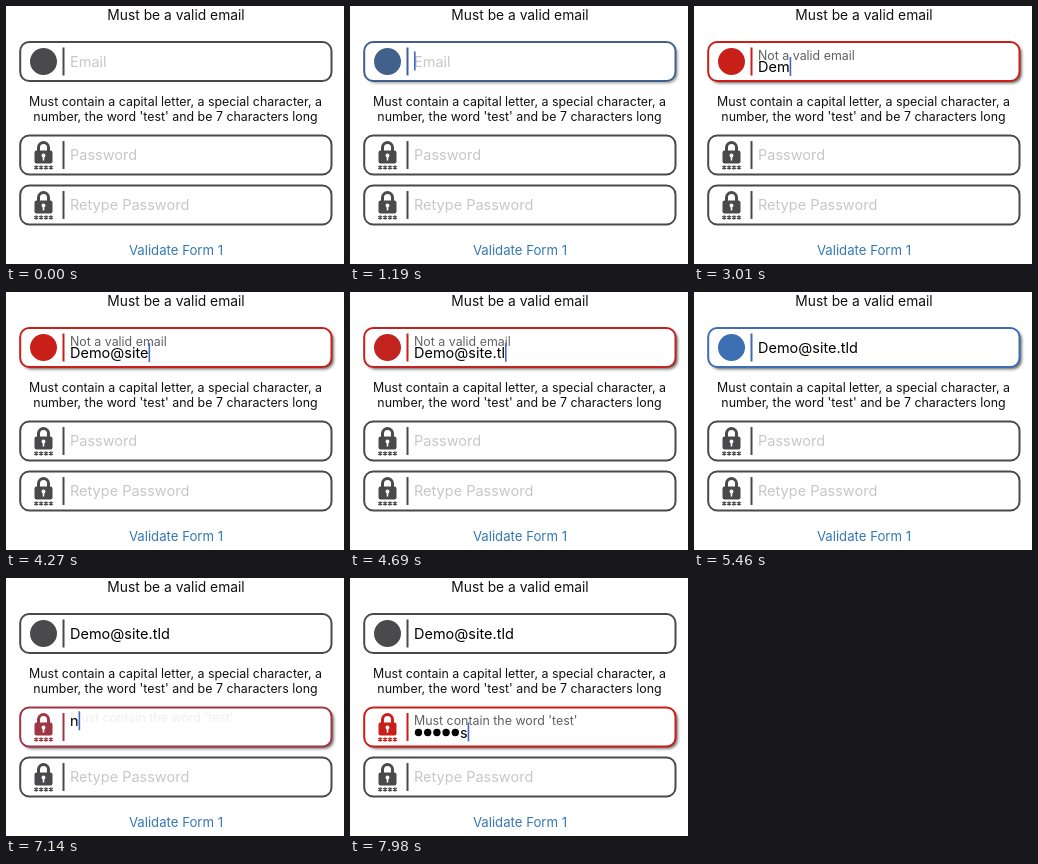
An HTML page with a canvas for the animation above (8000 ms loop, 338 by 258 pixels).

```html
<!DOCTYPE html>
<html lang="en">
<head>
<meta charset="utf-8">
<title>Form validation</title>
<style>
  html, body { margin: 0; width: 100%; height: 100%; overflow: hidden; background: #fff; }
  canvas { display: block; }
</style>
</head>
<body>
<canvas id="stage" width="338" height="258"></canvas>
<script>
const ctx = document.getElementById('stage').getContext('2d');
const LOOP = 8000, STEP = 70;
const GRAY = [74, 74, 76], BLUE = [60, 110, 178], LIGHT = [84, 134, 200], RED = [200, 32, 24];
const EMAIL = 'Demo@site.tld', PASSWORD = 'n1?Tes';
const EMAIL_KEYS = [2450, 2800, 3010, 3220, 3430, 3640, 3850, 4060, 4200, 4480, 4620, 4690, 4900];
const PASSWORD_KEYS = [7140, 7280, 7420, 7560, 7700, 7840];
let t = 0;

const ramp = (start, length) => Math.min(1, Math.max(0, (t - start) / length));
const mix = (a, b, p) => a + (b - a) * p;
const rgb = c => `rgb(${c.map(Math.round)})`;
const typed = (text, keys) => text.slice(0, keys.filter(k => t >= k).length);

// Each change is [start, colour, duration]
function tone(changes) {
  return rgb(changes.reduce((from, [start, to, length]) =>
    from.map((v, i) => mix(v, to[i], ramp(start, length))), GRAY));
}

function write(text, x, y, size, color, align = 'left') {
  ctx.font = `${size}px Inter, "Liberation Sans", sans-serif`;
  ctx.textAlign = align;
  ctx.fillStyle = color;
  ctx.fillText(text, x, y);
  return ctx.measureText(text).width;
}

function dot(x, y, r, color) {
  ctx.fillStyle = color;
  ctx.beginPath();
  ctx.arc(x, y, r, 0, 2 * Math.PI);
  ctx.fill();
}

function lock(mid, color) {
  ctx.strokeStyle = ctx.fillStyle = color;
  ctx.lineWidth = 3;
  ctx.beginPath();
  ctx.moveTo(32.5, mid - 3);
  ctx.lineTo(32.5, mid - 7.5);
  ctx.arc(37.5, mid - 7.5, 5, Math.PI, 0);
  ctx.lineTo(42.5, mid - 3);
  ctx.stroke();
  ctx.beginPath();
  ctx.roundRect(28.5, mid - 4.5, 18, 13, 2);
  ctx.fill();
  dot(37.5, mid + 0.5, 1.9, '#fff');
  ctx.fillRect(36.7, mid + 1, 1.6, 4.5);
  ctx.lineWidth = 1.1;
  ctx.beginPath();
  for (let i = 0; i < 4; i++) {
    for (let a = 0; a < 3; a++) {
      const x = 30.2 + 4.9 * i, y = mid + 12.5, angle = Math.PI * (a / 3 + 0.5);
      const dx = 2.3 * Math.cos(angle), dy = 2.3 * Math.sin(angle);
      ctx.moveTo(x - dx, y - dy);
      ctx.lineTo(x + dx, y + dy);
    }
  }
  ctx.stroke();
}

function field({ mid, hint, color, icon, glow = 0, text = '', secret, shift = 0,
                 error = '', enter = 0, leave = 0, caret = 0 }) {
  ctx.beginPath();
  ctx.roundRect(14.2, mid - 19.5, 311.3, 39, 9);
  ctx.save();
  ctx.shadowColor = `rgba(0,0,0,${0.6 * glow})`;
  ctx.shadowBlur = 3;
  ctx.shadowOffsetX = ctx.shadowOffsetY = 2.2;
  ctx.fillStyle = '#fff';
  ctx.fill();
  ctx.restore();
  ctx.strokeStyle = color;
  ctx.lineWidth = 2;
  ctx.stroke();
  ctx.fillStyle = color;
  ctx.fillRect(56.5, mid - 14, 2, 28);
  icon(mid, color);

  const base = mid + 5;
  ctx.globalAlpha = enter * (1 - leave);
  write(error, 64, base - 7 - 3 * (1 - enter), 12.4, '#606060');
  ctx.globalAlpha = 1;

  let x = 64 + shift, y = base;
  if (!text) {
    write(hint, x, y, 14.5, '#c7c7cb');
  } else {
    y += mix(-7, 5.5, enter) * (1 - leave);
    const hidden = secret ? text.length - 1 : 0;
    for (let i = 0; i < hidden; i++, x += 9.2) dot(x + 4.5, y - 5, 3.7, '#000');
    x += write(text.slice(hidden), x, y, 14.5, '#000');
  }
  ctx.globalAlpha = caret;
  ctx.fillStyle = '#4468c4';
  ctx.fillRect(x, y - 15, 1.6, 19);
  ctx.globalAlpha = 1;
}

function draw() {
  ctx.fillStyle = '#fff';
  ctx.fillRect(0, 0, 338, 258);
  write('Must be a valid email', 170, 13.5, 13.8, '#111', 'center');
  write('Must contain a capital letter, a special character, a', 169.5, 100, 12.4, '#111', 'center');
  write("number, the word 'test' and be 7 characters long", 169.5, 115, 12.4, '#111', 'center');
  write('Validate Form 1', 170, 249, 13.2, '#3478b4', 'center');

  field({
    mid: 55.5, hint: 'Email',
    icon: (mid, color) => dot(37.5, mid, 13.5, color),
    color: tone([[1015, BLUE, 280], [2410, RED, 70], [4680, BLUE, 250], [6160, GRAY, 130]]),
    glow: ramp(1015, 280) - ramp(6230, 140),
    text: typed(EMAIL, EMAIL_KEYS),
    shift: t >= 6230 && t < 6580 ? 3 : 0,
    error: 'Not a valid email',
    enter: ramp(2410, 400), leave: ramp(4680, 300),
    caret: ramp(1050, 140) - ramp(1680, 140) + ramp(2135, 105)
      - ramp(5285, 175) + ramp(5775, 105) - ramp(6125, 70)
  });
  field({
    mid: 149, hint: 'Password', icon: lock, secret: true,
    color: tone([[6160, LIGHT, 100], [6310, BLUE, 60], [7090, RED, 70]]),
    glow: ramp(6300, 70),
    text: typed(PASSWORD, PASSWORD_KEYS),
    error: "Must contain the word 'test'",
    enter: ramp(7100, 400),
    caret: ramp(6160, 105) - ramp(6545, 140) + ramp(6895, 105)
  });
  field({ mid: 199, hint: 'Retype Password', icon: lock, color: rgb(GRAY) });
}

function tick() {
  t = Math.floor(performance.now() % LOOP / STEP) * STEP;
  draw();
  requestAnimationFrame(tick);
}
tick();
</script>
</body>
</html>
```
